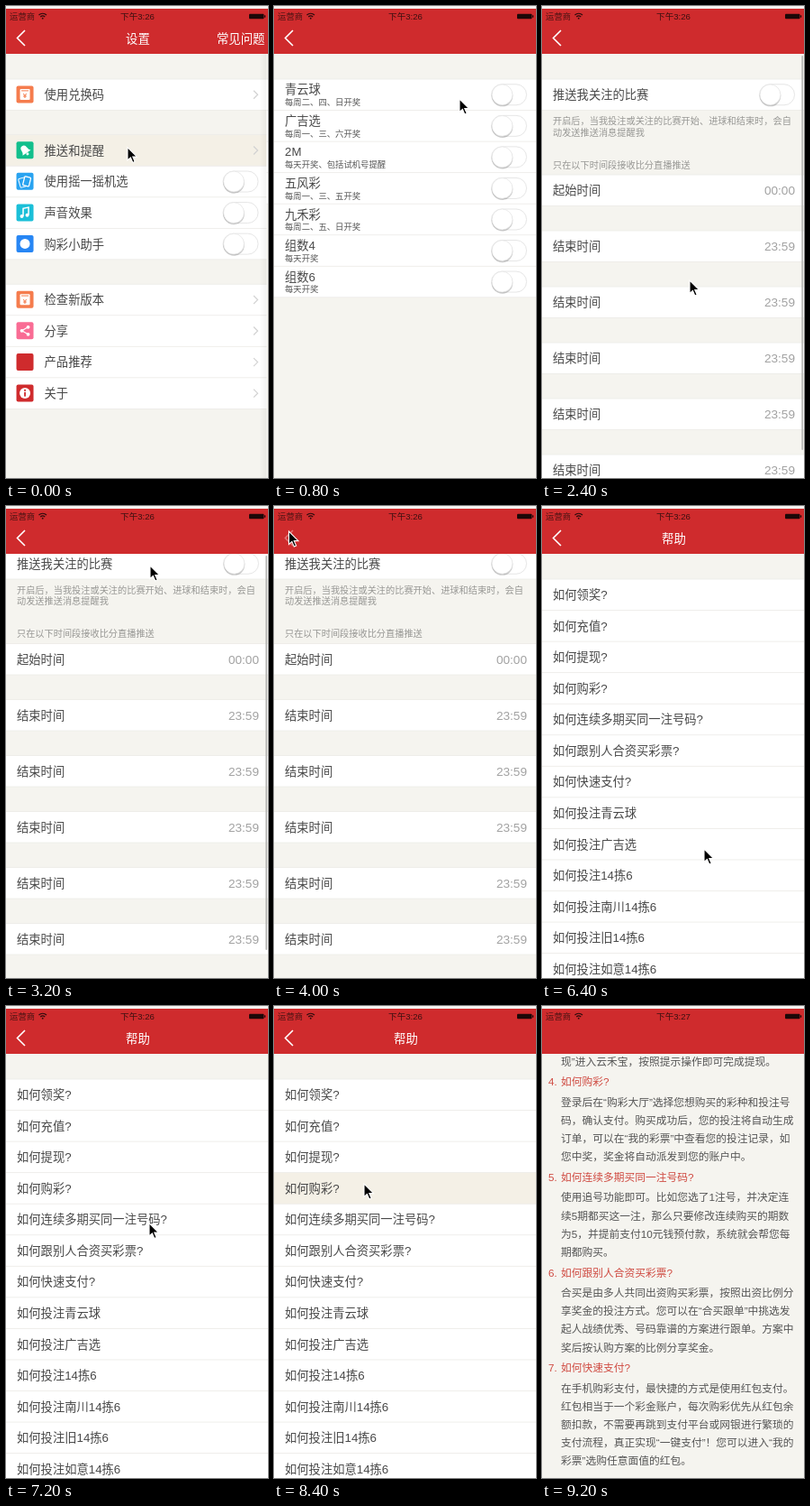
Animation of 291x523 px, one loop 9600 ms. Source, as an HTML page:

```html
<!DOCTYPE html>
<html lang="zh-CN">
<head>
<meta charset="utf-8">
<style>
html, body { margin: 0; width: 100%; height: 100%; overflow: hidden; background: #f5f4ef; }
svg { display: block; font-family: "Liberation Sans", "Noto Sans CJK SC", "Noto Sans CJK", sans-serif; font-weight: 300; }
</style>
</head>
<body>
<svg id="stage" width="291" height="523" viewBox="0 0 291 523"></svg>
<script>
const W = 291, H = 523, ROW = 34.55, STEP = 400;
const RED = '#cf2b2d', BG = '#f5f4ef', HILITE = '#f4f0e6', LINE = '#ebeae6';

// Drawing helpers
const rect = (x, y, w, h, fill, extra = '') =>
  `<rect x="${x}" y="${y}" width="${w}" height="${h}" fill="${fill}" ${extra}/>`;
const circle = (x, y, r, fill, extra = '') =>
  `<circle cx="${x}" cy="${y}" r="${r}" fill="${fill}" ${extra}/>`;
const path = (d, stroke, width, fill = 'none', extra = '') =>
  `<path d="${d}" stroke="${stroke}" stroke-width="${width}" fill="${fill}" ${extra}/>`;
const move = (x, y, body) => `<g transform="translate(${x} ${y})">${body}</g>`;
const turn = (angle, body) => `<g transform="rotate(${angle} 9.5 9.5)">${body}</g>`;
const text = (s, x, y, size = 13.3, fill = '#484848', extra = '') =>
  `<text x="${x}" y="${y + size * 0.37}" font-size="${size}" fill="${fill}" ${extra}>${s}</text>`;
const END = 'text-anchor="end"', MID = 'text-anchor="middle"';

const arrow = y => path(`M275.5 ${y - 4.5}l4.5 4.5l-4.5 4.5`, '#d2d2d2', 1.2);
const toggle = y =>
  rect(241.5, y - 11.5, 39, 23, '#fff', 'rx="11.5" stroke="#e6e6e6"') +
  circle(253.5, y + 1.3, 11.8, '#000', 'opacity=".2"') +
  circle(253.5, y, 11.4, '#fff', 'stroke="#e2e2e2" stroke-width=".7"');

// White group of rows; draw(item, centerY, index) fills each one
function rows(top, items, draw, hilite = -1) {
  let out = rect(0, top, W, items.length * ROW, '#fff');
  items.forEach((item, i) => {
    const y = top + i * ROW;
    if (i === hilite) out += rect(0, y, W, ROW, HILITE);
    out += rect(0, y - 0.4, W, 0.8, LINE) + draw(item, y + ROW / 2, i);
  });
  return out + rect(0, top + items.length * ROW - 0.4, W, 0.8, LINE);
}
const page = body => rect(0, 0, W, H, BG) + body;

// Settings icons, each on a 19 x 19 tile
const tile = (color, body = '') => rect(0, 0, 19, 19, color, 'rx="2"') + body;
const coupon = tile('#f57c4d', rect(4, 3.5, 11, 12, '#fff', 'rx="1"') +
  path('M5.5 5.3h8', '#f57c4d', 1) + text('¥', 9.5, 10.8, 8, '#f57c4d', MID + ' font-weight="700"'));
const bell = tile('#12bf8c', turn(-35,
  path('M4 13q2-1.5 2-5a3.5 4 0 0 1 7 0q0 3.500 2 5z', 'none', 0, '#fff') + circle(9.5, 14.5, 1.5, '#fff')));
const cards = tile('#29a3f0',
  turn(-16, rect(3, 5, 7, 10, 'none', 'stroke="#fff" rx="1"')) +
  turn(14, rect(8, 4, 7, 10, '#29a3f0', 'stroke="#fff" stroke-width="1.3" rx="1"')));
const note = tile('#1bbfd8', path('M7.500 13.500V5l6-1.300v8.500', '#fff', 1.5) +
  circle(6, 13.7, 2, '#fff') + circle(12, 12.4, 2, '#fff'));
const helper = tile('#2786f4', circle(9.5, 9.5, 5.5, '#fff'));
const share = tile('#f96c94', path('M13 5.500L6 9.500l7 4', '#fff', 1.2) +
  circle(13, 5.5, 1.9, '#fff') + circle(6, 9.5, 1.9, '#fff') + circle(13, 13.5, 1.9, '#fff'));
const info = tile(RED, circle(9.5, 9.5, 6, '#fff') + rect(8.6, 8.4, 1.8, 4.8, RED) + circle(9.5, 6.4, 1.1, RED));

const option = ([icon, label, isSwitch], y) =>
  move(12, y - 9.7, icon) + text(label, 43, y) + (isSwitch ? toggle(y) : arrow(y));

const settings = hilite => page(
  rows(81, [[coupon, '使用兑换码']], option) +
  rows(142.7, [[bell, '推送和提醒'], [cards, '使用摇一摇机选', 1], [note, '声音效果', 1], [helper, '购彩小助手', 1]], option, hilite) +
  rows(308.2, [[coupon, '检查新版本'], [share, '分享'], [tile(RED), '产品推荐'], [info, '关于']], option));

const menu = hilite => page(rows(81, ['开奖推送', '比分直播推送', '中奖动画', '购彩提醒'],
  (label, y) => text(label, 12.5, y) + arrow(y), hilite));

const GAMES = ['青云球', '广吉选', '2M', '五风彩', '九禾彩', '组数4', '组数6'];
const TIMES = ['每周二、四、日开奖', '每周一、三、六开奖', '每天开奖、包括试机号提醒',
  '每周一、三、五开奖', '每周二、五、日开奖', '每天开奖', '每天开奖'];
const draws = () => page(rows(81, GAMES, (name, y, i) =>
  text(name, 12, y - 5.8) + text(TIMES[i], 12, y + 8.4, 9.35, '#555') + toggle(y)));

const timeRow = (label, y) => text(label, 12, y) +
  text(label === '起始时间' ? '00:00' : '23:59', 281, y, 13.6, '#a2a2a2', END);
const scrollBar = (y, h) => rect(288.3, y, 1.8, h, '#b8b8b6', 'rx=".9"');
function match(scroll, bar) {
  const small = (s, y) => text(s, 12, y, 10.2, '#979794');
  let out = rows(81, ['推送我关注的比赛'], (s, y) => text(s, 12, y) + toggle(y)) +
    small('开启后，当我投注或关注的比赛开始、进球和结束时，会自', 127.5) +
    small('动发送推送消息提醒我', 140) + small('只在以下时间段接收比分直播推送', 176) +
    rows(187, ['起始时间'], timeRow);
  for (let i = 0; i < 5; i++) out += rows(249 + 62 * i, ['结束时间'], timeRow);
  return page(move(0, -scroll, out) + (bar ? scrollBar(55, 437) : ''));
}

const QUESTIONS = ['如何领奖?', '如何充值?', '如何提现?', '如何购彩?', '如何连续多期买同一注号码?',
  '如何跟别人合资买彩票?', '如何快速支付?',
  ...['青云球', '广吉选', '14拣6', '南川14拣6', '旧14拣6', '如意14拣6', ...GAMES.slice(2)].map(g => '如何投注' + g)];
const help = (scroll, hilite, bar) => page(
  move(0, -scroll, rows(81, QUESTIONS, (q, y) => text(q, 12, y), hilite)) +
  (bar ? scrollBar(55 + scroll * 0.46, 217) : ''));

const ANSWERS = `现”进入云禾宝，按照提示操作即可完成提现。
4. 如何购彩?
登录后在“购彩大厅”选择您想购买的彩种和投注号
码，确认支付。购买成功后，您的投注将自动生成
订单，可以在“我的彩票”中查看您的投注记录，如
您中奖，奖金将自动派发到您的账户中。
5. 如何连续多期买同一注号码?
使用追号功能即可。比如您选了1注号，并决定连
续5期都买这一注，那么只要修改连续购买的期数
为5，并提前支付10元钱预付款，系统就会帮您每
期都购买。
6. 如何跟别人合资买彩票?
合买是由多人共同出资购买彩票，按照出资比例分
享奖金的投注方式。您可以在“合买跟单”中挑选发
起人战绩优秀、号码靠谱的方案进行跟单。方案中
奖后按认购方案的比例分享奖金。
7. 如何快速支付?
在手机购彩支付，最快捷的方式是使用红包支付。
红包相当于一个彩金账户，每次购彩优先从红包余
额扣款，不需要再跳到支付平台或网银进行繁琐的
支付流程，真正实现“一键支付”！您可以进入“我的
彩票”选购任意面值的红包。`.split('\n');
function answers() {
  let y = 61.5, wasHead = false;
  return page(ANSWERS.map((line, i) => {
    const head = /^\d\. /.test(line);
    if (i) y += head || wasHead ? 22.5 : 20.2;
    wasHead = head;
    return head
      ? text(line.slice(0, 2), 7, y, 11.75, '#cf4a41') + text(line.slice(3), 21, y, 11.75, '#cf4a41')
      : text(line, 21, y, 11.75, '#555');
  }).join(''));
}

// Page pushed d pixels to the right, with the previous one behind it
function slide(under, over, d) {
  const rest = 1 - d / W;
  return move(-87.3 * rest, 0, under) + rect(0, 0, W, H, '#000', `opacity="${0.1 * rest}"`) +
    rect(d - 8, 0, 8, H, 'url(#shade)', `opacity="${0.25 + 0.75 * rest}"`) + move(d, 0, over);
}

function navBar({ title = '', right = '', back = 1, clock = '3:26' }) {
  return rect(0, 0, W, 53, RED) + rect(0, 0, W, 3, '#f4f2f0') +
    text('运营商', 4, 11.3, 9.4, '#4a1414') +
    path('M36.500 10a6 6 0 0 1 8.500 0M38.300 12a3.500 3.500 0 0 1 4.900 0', '#2a0c0c', 1.2) +
    circle(40.7, 13.7, 0.9, '#2a0c0c') +
    text('下午' + clock, 146, 11.3, 9.6, '#3a1010', MID + ' font-weight="500"') +
    rect(270, 8.7, 16.5, 5.6, '#1c0808', 'rx="1"') + rect(287, 10.3, 1.2, 2.4, '#1c0808') +
    path('M21 27L12.500 35.500L21 44', '#fff', 1.6, 'none', `opacity="${back}"`) +
    text(title, 146.5, 36, 13.4, '#fff', MID) + text(right, 287.5, 36, 13.4, '#fff', END);
}
const pointer = (x, y) => move(x, y,
  path('M0 0V14.500L3.400 11.400L5.800 17L8.200 16L5.800 10.600H10.500Z', '#fff', 1.1, '#000'));

const HOME = { title: '设置', right: '常见问题' }, HELP = { title: '帮助' }, PRESS = { back: 0.35 };

// One entry per 400 ms: page, pointer position, navigation bar
const scenes = [
  [slide(settings(0), menu(), 289.5), [135, 156.5], HOME],
  [menu(0), [206, 103]],
  [draws(), [206, 103]],
  [draws(), [17, 28], PRESS],
  [slide(menu(), draws(), 150), [18, 30], PRESS],
  [menu(1), [164, 130]],
  [match(0, 1), [164, 304]],
  [match(90, 1), [160, 150]],
  [match(34.5, 1), [160, 66]],
  [match(34.5), [158, 213]],
  [match(34.5), [16.5, 28], PRESS],
  [menu(), [18, 29]],
  [menu(2), [150, 160]],
  [slide(settings(), menu(), 12.5), [21.5, 34], PRESS],
  [slide(settings(), menu(), 285), [22, 34], HOME],
  [settings(), [260, 36], HOME],
  [help(0), [180, 380], HELP],
  [help(180, -1, 1), [165, 200], HELP],
  [help(0), [159, 240.5], HELP],
  [help(0, -1, 1), [82, 205], HELP],
  [help(0), [100, 197], HELP],
  [help(0, 3), [100, 197], HELP],
  [answers(), [154, 65], { back: 0 }],
  [answers(), null, { back: 0, clock: '3:27' }],
];
const stage = document.getElementById('stage');
const defs = '<defs><linearGradient id="shade"><stop stop-opacity="0"/><stop offset="1" stop-opacity=".2"/></linearGradient></defs>';

let shown = -1;
function frame() {
  const i = Math.floor(performance.now() / STEP) % scenes.length;
  if (i !== shown) {
    const [body, cursor, nav = {}] = scenes[shown = i];
    stage.innerHTML = defs + body + navBar(nav) + (cursor ? pointer(...cursor) : '');
  }
  requestAnimationFrame(frame);
}
frame();
</script>
</body>
</html>
```
